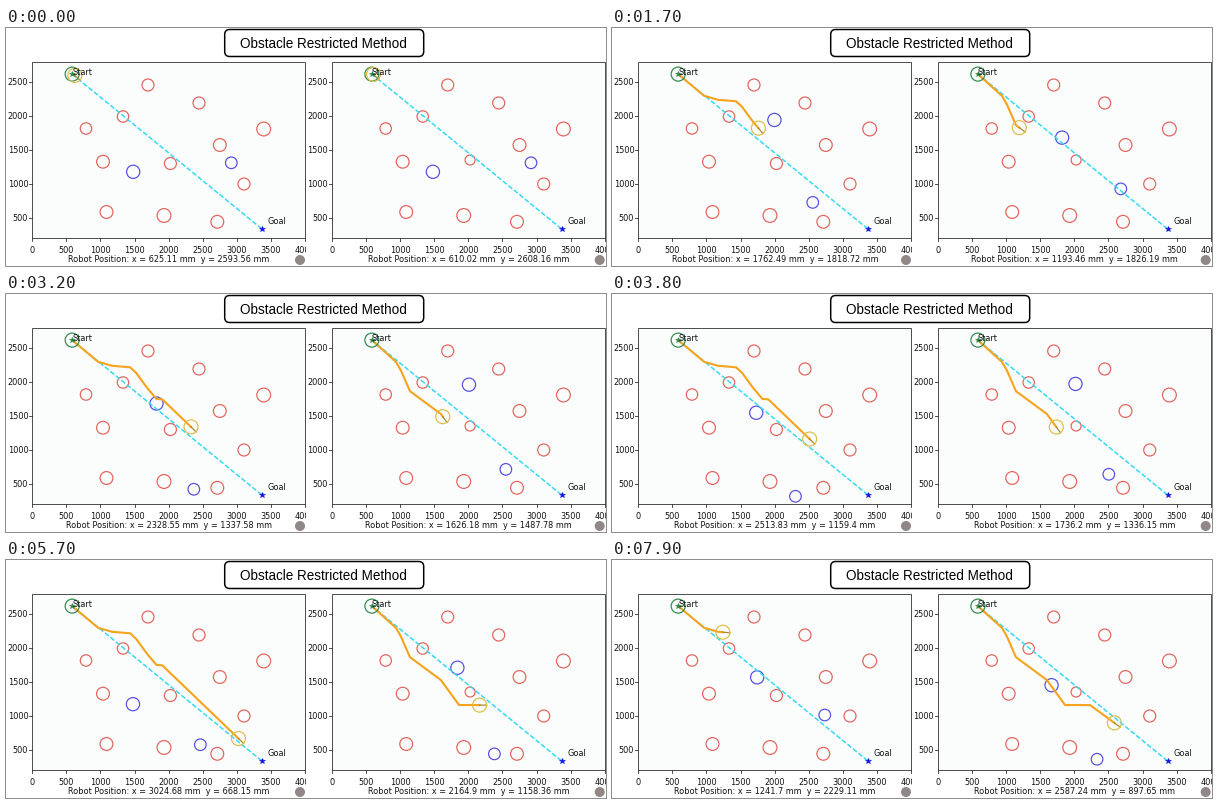
Animation of 600x238 px, one loop 8000 ms. Source, as a matplotlib script:

```python
import numpy as np
import matplotlib.pyplot as plt
from matplotlib.animation import FuncAnimation
from matplotlib.patches import Circle, FancyBboxPatch, Rectangle

W, H, DPI = 600, 238, 100
FRAMES, STEP = 80, 100
PX = 72 / DPI              # points per pixel
FONT = 8.15 * PX
X0, Y0, SX, SY = 26.2, 224, 0.0682, 0.0681

RED, BLUE, GREEN = "#e2635a", "#524fe0", "#2f8a4c"
CYAN, ORANGE, GOLD = "#33d9f4", "#f6a31e", "#dfbd48"
INK = "#111111"
START, GOAL = (586, 2612), (3368, 338)

# Corners of each robot's route, in mm.
LEFT = [(625.11, 2593.56), (966, 2294), (1171, 2235), (1435, 2213),
        (1523, 2132), (1684, 1912), (1822, 1748), (1908, 1742), GOAL]
RIGHT = [(610.02, 2608.16), (940, 2292), (1010, 2170), (1145, 1862),
         (1597, 1528), (1864, 1160), (2232, 1158), (2700, 815)]

# Fixed obstacles by radius, in panel pixels.
ROCKS = {
    5.7: [(117, 88.5), (80, 100.5)],
    6.0: [(142, 57), (193, 75), (238, 156)],
    6.4: [(213.8, 117), (97, 133.7), (100.5, 184), (211.3, 193.8)],
    6.9: [(257.7, 101), (158, 187.5)],
}

fig = plt.figure(figsize=(W / DPI, H / DPI), dpi=DPI, facecolor="white")
ax = fig.add_axes([0, 0, 1, 1])
ax.set(xlim=(0, W), ylim=(H, 0))
ax.axis("off")


def bounce(u, lo, hi):
    span = hi - lo
    return hi - abs((u - lo) % (2 * span) - span)


class Panel:
    """One plot; its robot slows down as the drawn history grows."""

    def __init__(self, left, route, rock, pace, lag, drift, period):
        self.left, self.pace, self.lag = left, pace, lag
        self.drift, self.period = drift, period
        self.xy = np.array(route, float)
        steps = np.hypot(*np.diff(self.xy, axis=0).T)
        self.dist = np.append(0, np.cumsum(steps))
        self.clip = Rectangle((left, 30), 300, 208, transform=ax.transData)
        self.draw_axes()
        self.draw_scene(rock)

    def px(self, x, y):
        return self.left + X0 + SX * x, Y0 - SY * y

    def text(self, x, y, s, ha="center"):
        t = ax.text(x, y, s, ha=ha, va="baseline", fontsize=FONT,
                    family="DejaVu Sans", color=INK, zorder=8, clip_on=True)
        t.set_clip_path(self.clip)
        return t

    def line(self, xs, ys, color, width, z, **kw):
        return ax.plot(xs, ys, color=color, lw=width * PX, zorder=z, **kw)[0]

    def ring(self, x, y, r, color, z=3):
        c = Circle((x, y), r, fill=False, ec=color, lw=1.2 * PX, zorder=z)
        return ax.add_patch(c)

    def draw_axes(self):
        a, b = self.left + X0, self.left + 299
        ax.add_patch(Rectangle((a, 33.5), b - a, 176.5, fc="#fbfcfc",
                               ec="#333333", lw=0.85 * PX, zorder=1))
        for v in range(0, 4001, 500):
            x = self.px(v, 0)[0]
            self.line([x, x], [210, 212.8], "#333333", 0.85, 2)
            self.text(x, 224.6, str(v))
        for v in range(500, 2501, 500):
            y = self.px(0, v)[1]
            self.line([a - 2.8, a], [y, y], "#333333", 0.85, 2)
            self.text(a - 4, y + 3, str(v), "right")

    def draw_scene(self, rock):
        (sx, sy), (gx, gy) = self.px(*START), self.px(*GOAL)
        for r, spots in ROCKS.items():
            for x, y in spots:
                self.ring(self.left + x, y, r, RED)
        self.ring(self.left + 164.4, *rock, RED)
        self.line([sx, gx], [sy, gy], CYAN, 1.5, 4, dashes=(3.3, 1.4))
        self.ring(sx, sy, 7, GREEN, 6)
        for x, y, c in ((sx, sy, GREEN), (gx, gy, "#1010e0")):
            ax.plot(x, y, "*", color=c, ms=5.6 * PX, mew=0.4, zorder=7)
        self.text(sx, sy + 1.2, "Start", "left")
        self.text(self.left + 261.8, 195.5, "Goal", "left")
        ax.add_patch(Circle((self.left + 294, 232), 5, fc="#8f8886",
                            ec="none", zorder=2))
        self.trail = self.line([], [], ORANGE, 2.1, 5, solid_joinstyle="round")
        self.nose = self.line([], [], "#a58a28", 1.2, 6)
        self.robot = self.ring(0, 0, 7, GOLD, 6)
        self.big = self.ring(0, 0, 6.6, BLUE)
        self.small = self.ring(0, 0, 5.8, BLUE)
        self.label = self.text(self.left + 163, 234, "")

    def update(self, t):
        t %= self.period
        s = self.pace * (np.sqrt(t + self.lag) - np.sqrt(self.lag))
        s = min(s, self.dist[-1] - 1)
        k = np.searchsorted(self.dist, s, side="right")
        step = self.xy[k] - self.xy[k - 1]
        way = step / np.hypot(*step)
        x, y = pos = self.xy[k - 1] + way * (s - self.dist[k - 1])

        cx, cy = self.px(x, y)
        self.trail.set_data(*self.px(*np.vstack([START, self.xy[1:k], pos]).T))
        self.nose.set_data([cx, cx + 7.2 * way[0]], [cy, cy - 7.2 * way[1]])
        self.robot.center = cx, cy

        u = self.drift * s
        d = bounce(u, -2.5, 68.5)
        self.big.center = self.left + 127.2 + 0.5625 * d, 143.8 - 0.828 * d
        d = bounce(0.744 * u, -2, 80.5)
        self.small.center = self.left + 225.3 - 0.527 * d, 134.8 + 0.85 * d
        self.label.set_text(f"Robot Position: x = {round(float(x), 2)} mm  "
                            f"y = {round(float(y), 2)} mm")


ax.add_patch(FancyBboxPatch((218.7, 1.5), 199, 27, fc="white", ec="black",
                            boxstyle="round,pad=0,rounding_size=5",
                            lw=1.5 * PX, zorder=9))
ax.text(317.8, 20, "Obstacle Restricted Method", ha="center", va="baseline",
        family="Liberation Sans", fontsize=13.55 * PX, color="black",
        zorder=10)

panels = [
    Panel(0, LEFT, (135.5, 6), pace=1669, lag=0.3, drift=0.0433, period=7.22),
    Panel(299.7, RIGHT, (132, 5), pace=1237, lag=0.43, drift=0.0415, period=8),
]


def draw(i):
    for p in panels:
        p.update(i * STEP / 1000)
    return []


anim = FuncAnimation(fig, draw, frames=FRAMES, interval=STEP, repeat=True,
                     repeat_delay=0, blit=False)
plt.show()
```
